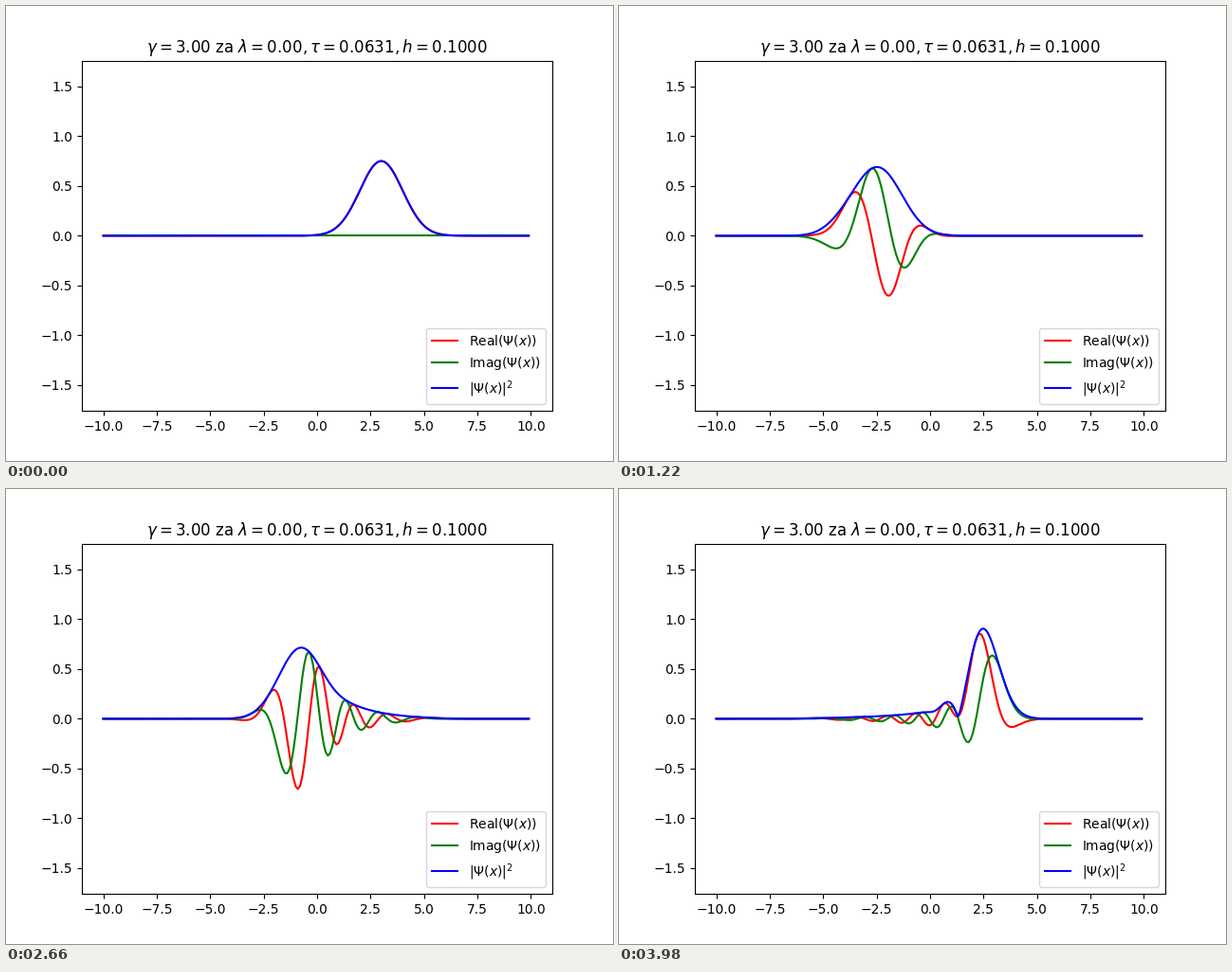
These frames come from a looping animation (640x480 px, 4000 ms). A matplotlib script:

```python
import numpy as np
import matplotlib.pyplot as plt
from matplotlib.animation import FuncAnimation

STEPS = 200
GAMMA, LAM = 3.0, 0.0
H = 0.1
TAU = 4 * np.pi / (STEPS - 1)

x = -10 + H * np.arange(200)


def propagate():
    """Crank-Nicolson evolution of a displaced oscillator ground state."""
    n = len(x)
    hop = np.eye(n, k=1) + np.eye(n, k=-1)
    ham = (2 * np.eye(n) - hop) / (2 * H**2) + np.diag(x**2 / 2 + LAM * x**4)
    half = 0.5j * TAU * ham
    step = np.linalg.solve(np.eye(n) + half, np.eye(n) - half)

    psi = np.pi**-0.25 * np.exp(-(x - GAMMA)**2 / 2) + 0j
    states = [psi]
    for _ in range(STEPS - 1):
        psi = step @ psi
        states.append(psi)
    return states


states = propagate()

fig, ax = plt.subplots(figsize=(6.4, 4.8), dpi=100)
ax.set_xlim(-11, 11)
ax.set_ylim(-1.76, 1.76)
ax.set_title(rf"$\gamma = {GAMMA:.2f}$ za $\lambda = {LAM:.2f}, "
             rf"\tau = {TAU:.4f}, h = {H:.4f}$")

parts = [
    (np.real, "red", r"Real($\Psi(x)$)"),
    (np.imag, "green", r"Imag($\Psi(x)$)"),
    (np.abs, "blue", r"$|\Psi(x)|^2$"),
]
lines = [ax.plot(x, f(states[0]), color=c, label=label)[0]
         for f, c, label in parts]
ax.legend(loc="lower right")


def update(i):
    for line, (f, _, _) in zip(lines, parts):
        line.set_ydata(f(states[i]))
    return lines


anim = FuncAnimation(fig, update, frames=STEPS, interval=20,
                     repeat=True, repeat_delay=0)
plt.show()
```
